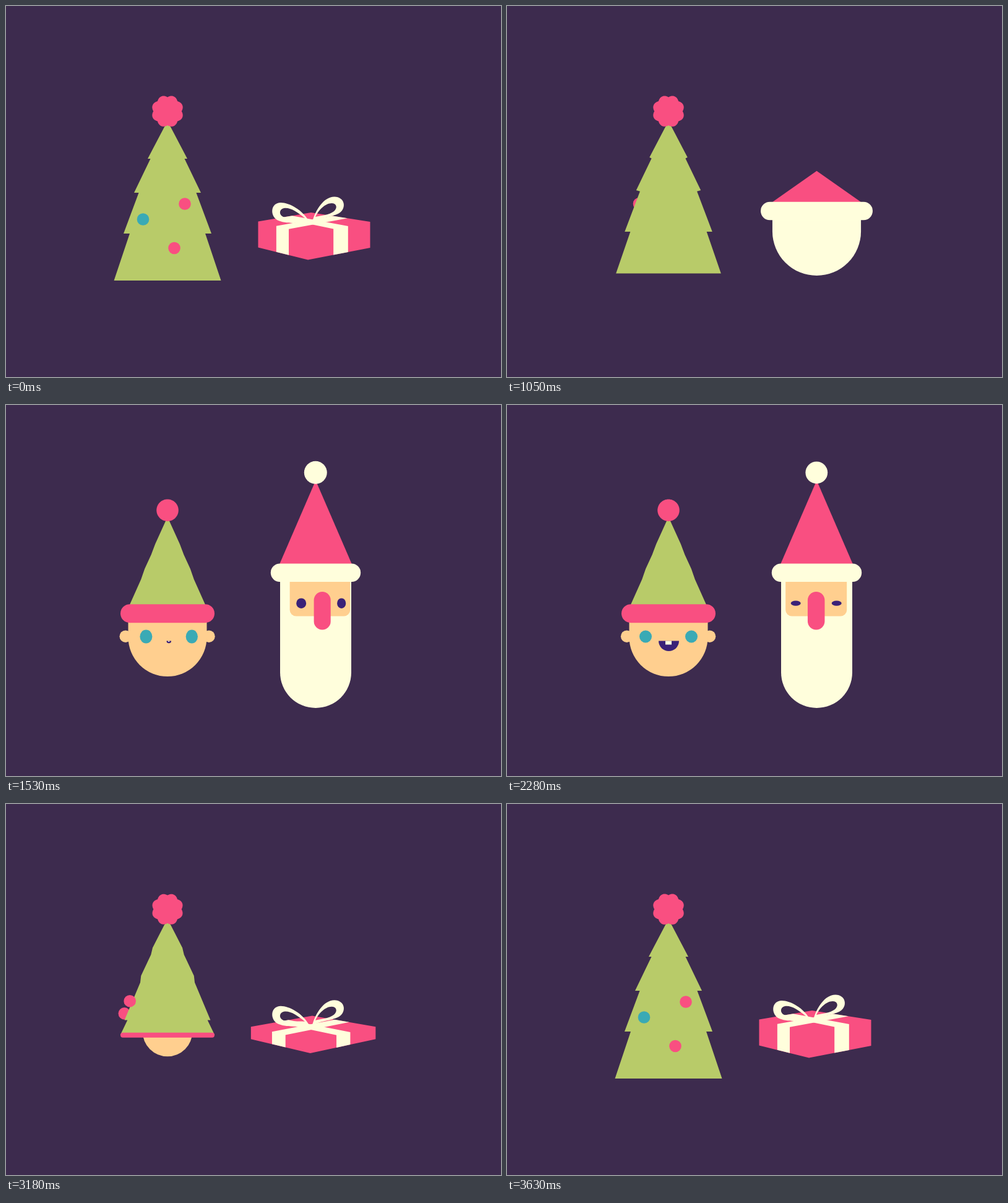
Animation, 800 px wide and 600 px high, one loop 4020 ms. Source, as an HTML page with a canvas:

```html
<!DOCTYPE html>
<html lang="en">
<head>
<meta charset="utf-8">
<title>Holiday shapes</title>
<style>
html, body { margin: 0; width: 100%; height: 100%; overflow: hidden; background: #3d2b4e; }
canvas { display: block; }
</style>
</head>
<body>
<canvas id="stage" width="800" height="600"></canvas>
<script>
const ctx = document.getElementById('stage').getContext('2d');
const LOOP = 4020, STEP = 30;
const BG = '#3d2b4e', GREEN = '#b8cb69', PINK = '#f94f81', CREAM = '#fffedc',
      SKIN = '#ffcf8f', TEAL = '#3aaab5', NAVY = '#3a2178';
const RAD = Math.PI / 180;

// ---- Timing ----
const clamp = v => Math.max(0, Math.min(1, v));
const mix = (a, b, k) => a + (b - a) * k;
const mixPoint = (a, b, k) => [mix(a[0], b[0], k), mix(a[1], b[1], k)];
const span = (t, from, to) => clamp((t - from) / (to - from));
const ease = (t, from, to) => { const u = span(t, from, to); return u * u * (3 - 2 * u); };

// Rises 0 to 1, holds, then falls back to 0
const phase = (t, riseFrom, riseTo, fallFrom, fallTo) =>
  ease(t, riseFrom, riseTo) - ease(t, fallFrom, fallTo);
// Single smooth hump
const bump = (t, centre, half) => Math.cos(Math.PI / 2 * clamp(Math.abs(t - centre) / half)) ** 2;
// 0 to 1 with overshoot
const pop = (t, from, to, over = 1.7) => {
  const u = span(t, from, to) - 1;
  return 1 + u * u * ((over + 1) * u + over);
};
// 1 until the start, then a damped swing to 0
const wobble = (t, start, decay, period) => {
  const d = Math.max(0, t - start);
  return Math.exp(-d / decay) * Math.cos(2 * Math.PI * d / period);
};

// ---- Shapes ----
function ellipse(x, y, rx, ry, color) {
  if (rx <= 0 || ry <= 0) return;
  ctx.fillStyle = color;
  ctx.beginPath();
  ctx.ellipse(x, y, rx, ry, 0, 0, 7);
  ctx.fill();
}
const disc = (x, y, r, color) => ellipse(x, y, r, r, color);

function polygon(points, color) {
  ctx.fillStyle = color;
  ctx.beginPath();
  points.forEach(p => ctx.lineTo(...p));
  ctx.closePath();
  ctx.fill();
}

function roundRect(x, y, w, h, r, color) {
  if (w <= 0 || h <= 0) return;
  ctx.fillStyle = color;
  ctx.beginPath();
  ctx.roundRect(x, y, w, h, r);
  ctx.fill();
}

// A pair of eyes on a turning head
function eyes(x, y, headR, gap, turn, rx, ry, color) {
  const base = Math.asin(gap / headR);
  for (const angle of [turn - base, turn + base]) {
    const w = Math.min(1, Math.cos(angle) / Math.cos(base));
    ellipse(x + headR * Math.sin(angle), y, rx * w, ry, color);
  }
}

// ---- Tree and elf ----
const ELF_X = 261;
const TIERS = [ // ledge height and half width on the tree, height on the hat
  { y: 247, half: 32, hatY: 225 },
  { y: 302, half: 54, hatY: 265 },
  { y: 368, half: 71, hatY: 340 }
];
const BAUBLES = [ // place on the tree, orbit radius, rise towards the hat
  { x: 28, y: 320, r: 61, lift: 2, color: PINK },
  { x: 11, y: 391.5, r: 72, lift: 80, color: PINK },
  { x: -39.5, y: 345, r: 62, lift: 30, color: TEAL }
];

function baubles(turn, hat, front) {
  for (const b of BAUBLES) {
    const angle = Math.asin(b.x / b.r) + turn * RAD;
    if ((Math.cos(angle) >= 0) === front)
      disc(ELF_X + b.r * Math.sin(angle), b.y - b.lift * hat, 9.8, b.color);
  }
}

function treeShape(hat, hem, bloom) {
  const hatHalf = y => 0.424 * (y - 178);
  const side = TIERS.flatMap(({ y, half, hatY }) => {
    const notchY = Math.min(hatY + 17, 340);
    return [
      [mix(half, hatHalf(hatY), hat), mix(y, hatY, hat)],
      [mix(half * 0.86, hatHalf(notchY) * 0.97, hat), mix(y, notchY, hat)]
    ];
  });
  side.push([mix(86.5, 71, hat), hem]);
  const top = mix(181, 190.5, bloom), w = 5 * bloom;
  ctx.fillStyle = GREEN;
  ctx.beginPath();
  ctx.moveTo(ELF_X - w, top + w);
  ctx.quadraticCurveTo(ELF_X, top - w * 0.6, ELF_X + w, top + w);
  side.forEach(([x, y]) => ctx.lineTo(ELF_X + x, y));
  side.reverse().forEach(([x, y]) => ctx.lineTo(ELF_X - x, y));
  ctx.fill();
}

// Eight soft lobes that flatten into a circle
function pompom(r, bloom) {
  const points = [];
  for (let a = 0; a < 360; a += 3) {
    const d = r + bloom * (3.2 * Math.abs(Math.sin(4 * a * RAD)) - 1.9);
    points.push([ELF_X + d * Math.cos(a * RAD), 170.2 + d * Math.sin(a * RAD)]);
  }
  polygon(points, PINK);
}

function elfFace(t, leaving) {
  const turn = 30 * RAD * ((1 - span(t, 1380, 1650)) ** 3 + leaving);
  const open = pop(t, 1400, 1640) - ease(t, 2750, 2920);
  eyes(ELF_X, 374.5, 63, 37, turn, 10, 10 * open, TEAL);

  const size = phase(t, 1480, 1640, 2700, 2970);
  ctx.save();
  ctx.translate(ELF_X + 0.5 + 38 * Math.sin(turn), 381.5);
  ctx.scale(size, size * (1 - 0.4 * bump(t, 2000, 150)));
  ctx.beginPath();
  ctx.arc(0, 0, 16.5, 0, Math.PI);
  ctx.fillStyle = NAVY;
  ctx.fill();
  ctx.fillStyle = CREAM;
  ctx.fillRect(-5.5, 0, 10, 6);
  ctx.restore();
}

function elf(t, leaving) {
  const hat = phase(t, 980, 1325, 3020, 3427);
  const head = phase(t, 980, 1322, 3010, 3425);
  const bloom = 1 - phase(t, 1050, 1215, 3000, 3200);
  const turn = -170 * phase(t, 768, 1110, 3060, 3370);
  const spinning = t < 1110 || t > 3060;
  const hem = mix(444, 337.2, hat);

  if (spinning) baubles(turn, hat, false);
  if (head > 0.98) {
    const tuck = 16 * (1 - pop(t, 1350, 1560) + ease(t, 2910, 2990));
    disc(193.6 + tuck + 2.5 * leaving, 374.2, 9.7, SKIN);
    disc(327.6 - tuck - 11 * leaving, 374.2, 9.7, SKIN);
  }
  const r = 63.5 * head, y = mix(355, 375.5, head);
  disc(ELF_X, y, r, SKIN);
  roundRect(ELF_X - r, hem, 2 * r, y - hem, 0, SKIN);
  if (t >= 1380 && t < 2910) elfFace(t, leaving);

  treeShape(hat, hem, bloom);
  const brim = 30 * phase(t, 1130, 1255, 3040, 3250);
  roundRect(185, hem - brim / 2, 152, brim, brim / 2, PINK);
  pompom(mix(mix(6, 17.7, pop(t, 1310, 1540)), 24.7, bloom), bloom);
  if (spinning) baubles(turn, hat, true);
}

// ---- Gift ----
const LID = { // corners at rest and squashed
  left: [[407.5, 348.5], [395, 361]], back: [[493, 334], [495, 343]],
  right: [[588.5, 349], [598, 361]], front: [[488, 368.5], [492, 384]]
};
const BOW = new Path2D(
  'M490 349C480 330 458 318 444 318C428 318 426 338 438 346C452 353 472 351 490 349Z' +
  'M483 343C470 332 458 325 449 327C441 329 441 338 448 341C456 344 470 342 483 343Z' +
  'M495 349C500 330 514 308 531 308.5C547 309 550 325 541 333C532 341 512 341 497 348Z' +
  'M500 341C505 330 516 319 526 319C535 319 536 327 530 332C522 338 510 339 500 341Z');

function gift(t) {
  const squash = t < 2000 ? ease(t, 780, 1000) : wobble(t, 3175, 75, 420);
  const [left, back, right, front] = Object.values(LID).map(([a, b]) => mixPoint(a, b, squash));
  const height = mix(42, 18.5, squash);
  const drop = ([x, y]) => [x, y + height];
  polygon([back, right, drop(right), drop(front), drop(left), left], PINK);

  // Band over the lid, folded down the near side
  const band = (near, far, from, to) => {
    from -= 0.01 * squash;
    to -= 0.035 * squash;
    const a = mixPoint(...near, from), b = mixPoint(...near, to);
    polygon([a, mixPoint(...far, from), mixPoint(...far, to), b, drop(b), drop(a)], CREAM);
  };
  band([left, front], [back, right], 0.365, 0.615);
  band([front, right], [left, back], 0.41, 0.645);

  ctx.save();
  ctx.translate(0, 350 + 9.5 * squash);
  ctx.scale(1, 1 + 0.28 * bump(t, 3465, 170));
  ctx.translate(0, -350);
  ctx.fillStyle = CREAM;
  ctx.fill(BOW, 'evenodd');
  ctx.restore();
}

// ---- Bearded figure ----
const BEARD_X = 500.5, FACE_R = 67;

function beardedFace(t, leaving) {
  const turn = RAD * (110 * (1 - span(t, 1320, 1700)) ** 3 + 115 * leaving);
  const half = Math.asin(49.5 / FACE_R), middle = BEARD_X - 0.8;
  const around = angle => middle + FACE_R * Math.sin(Math.min(Math.PI / 2, angle));

  ctx.save();
  ctx.beginPath();
  ctx.rect(BEARD_X - 57.5, 280, 115, 90);
  ctx.clip();
  const x = around(turn - half);
  roundRect(x, 276, around(turn + half) - x, 65.5, 10, SKIN);
  ctx.restore();

  const open = 1 - 0.95 * phase(t, 1890, 2040, 2170, 2400);
  eyes(middle, 320.7, FACE_R, 33, turn, 8, 8.3 * open, NAVY);
  const w = 27.5 * Math.cos(turn);
  roundRect(around(turn) - w / 2, 302, w, 61.5, w / 2, PINK);
}

function bearded(t, leaving) {
  const grow = phase(t, 1010, 1125, 3030, 3130);
  const stretch = bump(t, 1125, 165) + bump(t, 3030, 165);
  const tip = mix(335, 122, grow) - 47 * stretch ** 3;
  const bottom = mix(400, 490, grow) + 19 * stretch;
  const brimY = mix(340, 256.5, grow);
  const width = mix(1.45, 1, grow) - 0.14 * stretch;
  const half = 57.5 * width, r = Math.min(half, bottom - brimY - 15);

  roundRect(BEARD_X - half, brimY + 14, 2 * half, bottom - brimY - 14, [0, 0, r, r], CREAM);
  if (t >= 1320 && t <= 2910) beardedFace(t, leaving);
  polygon([[BEARD_X, tip], [BEARD_X + half + 1, brimY + 1], [BEARD_X - half - 1, brimY + 1]], PINK);
  roundRect(BEARD_X - 72.7 * width, brimY, 145.4 * width, 29.5, 14.7, CREAM);
  disc(500.3, 109.3, 17.9 * (pop(t, 1310, 1560, 2.7) - ease(t, 2930, 3030)), CREAM);
}

function draw(t) {
  ctx.fillStyle = BG;
  ctx.fillRect(0, 0, 800, 600);
  const leaving = span(t, 2400, 2910) ** 3;
  elf(t, leaving);
  if (t < 1040 || t >= 3125) gift(t);
  else bearded(t, leaving);
}

const start = performance.now();
function tick() {
  const t = (performance.now() - start) % LOOP;
  draw(Math.floor(t / STEP) * STEP);
  requestAnimationFrame(tick);
}
tick();
</script>
</body>
</html>
```
